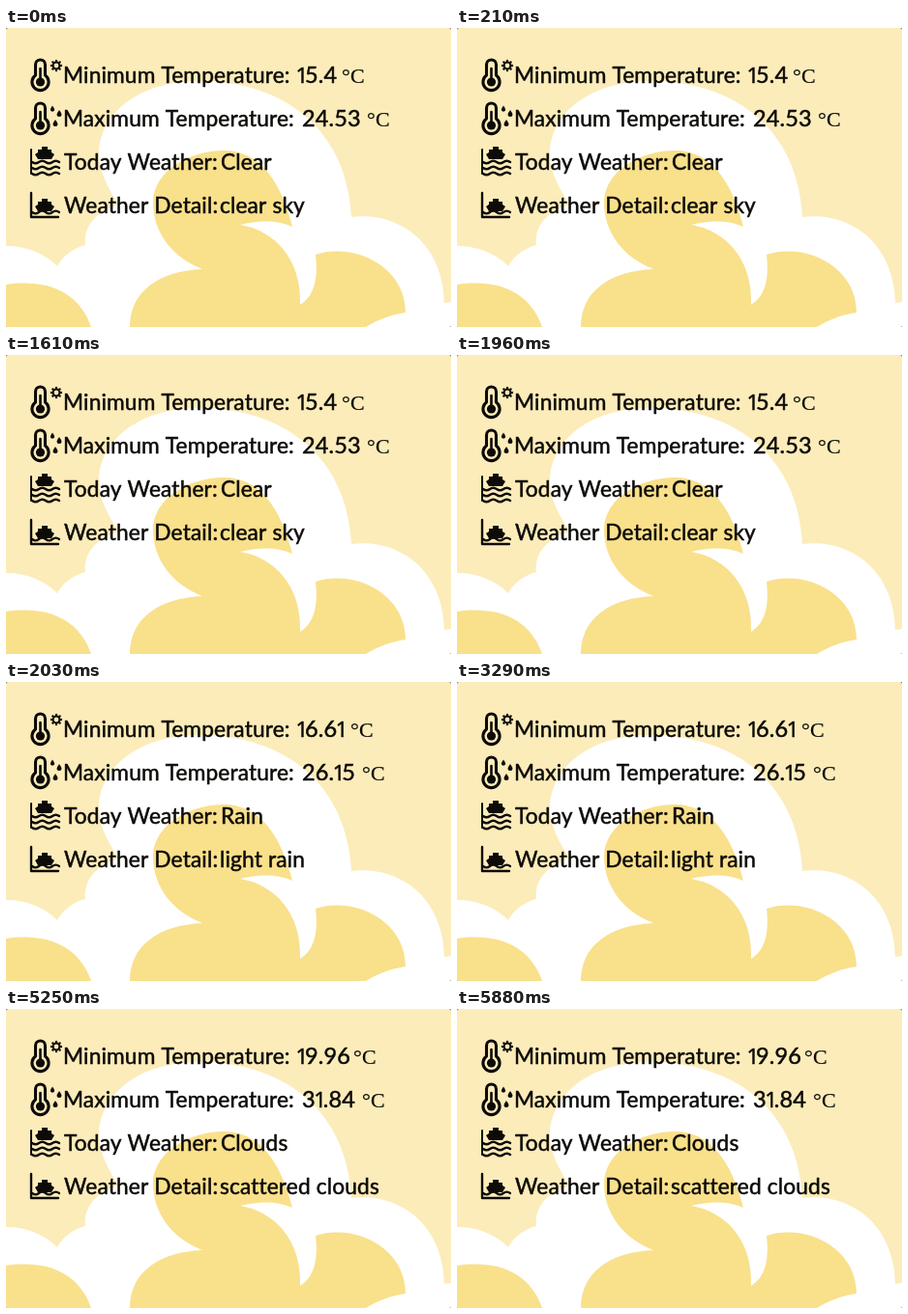
An HTML page with a canvas for the animation above (6090 ms loop, 460 px wide and 310 px high).

```html
<!DOCTYPE html>
<html lang="en">
<head>
<meta charset="utf-8">
<title>Weather card</title>
<style>
html, body { margin: 0; width: 100%; height: 100%; overflow: hidden; background: #777; }
canvas { display: block; width: 460px; height: 310px; }
</style>
</head>
<body>
<canvas id="card"></canvas>
<script>
const W = 460, H = 310, LOOP = 6090;
const INK = '#0d0b08', SKY = '#fcecba', SUN = '#f9e08b';
const canvas = document.getElementById('card');
const ctx = canvas.getContext('2d');
const dpr = window.devicePixelRatio || 1;
canvas.width = W * dpr;
canvas.height = H * dpr;

const days = [
  { from: 0, min: '15.4', minUnit: 347, max: '24.53', maxUnit: 373, sky: 'Clear', detail: 'clear sky' },
  { from: 2030, min: '16.61', minUnit: 356, max: '26.15', maxUnit: 368, sky: 'Rain', detail: 'light rain' },
  { from: 5180, min: '19.96', minUnit: 359, max: '31.84', maxUnit: 368, sky: 'Clouds', detail: 'scattered clouds' }
];

const shapes = [
  ['#fff', `M0 226 C22 226 40 234 53 247 C59 236 70 228 82 225
    C80 206 92 191 116 183 C106 166 95 148 96 128 C98 90 135 55 200 55
    C290 55 353 108 357 196 C405 190 452 222 453 285 L460 284 V310 H0 Z`],
  [SUN, 'M0 266 C40 260 75 272 88 310 H0 Z'],
  [SUN, `M128 310 C128 273 158 252 203 250 C172 238 152 212 152 181
    C152 149 189 127 225 127 C262 127 284 158 296 206
    C280 199 262 199 242 204 C278 210 306 240 304 287
    C318 278 323 262 320 235 C360 222 413 247 413 295
    C398 297 383 303 372 310 Z`]
].map(([color, d]) => [color, new Path2D(d)]);

function line(d, width) {
  ctx.lineWidth = width;
  ctx.stroke(new Path2D(d));
}

function dot(x, y, r) {
  ctx.beginPath();
  ctx.arc(x, y, r, 0, Math.PI * 2);
  ctx.fill();
}

function thermometer(y) {
  line(`M30.5 ${y + 16} V${y + 5} A5 5 0 0 1 40.5 ${y + 5} V${y + 16} A8.6 8.6 0 1 1 30.5 ${y + 16} Z`, 3.1);
  line(`M35.5 ${y + 9} V${y + 20}`, 2.6);
  dot(35.5, y + 23, 4.6);
}

function sun(x, y) {
  ctx.lineWidth = 2;
  ctx.beginPath();
  ctx.arc(x, y, 3.4, 0, Math.PI * 2);
  ctx.stroke();
  for (let i = 0; i < 8; i++) {
    const a = i * Math.PI / 4;
    dot(x + 5 * Math.cos(a), y + 5 * Math.sin(a), 1.2);
  }
}

function drop(x, y, s) {
  ctx.fill(new Path2D(`M${x} ${y - 1.6 * s} Q${x + 2 * s} ${y + s} ${x} ${y + 1.2 * s} Q${x - 2 * s} ${y + s} ${x} ${y - 1.6 * s} Z`));
}

function boat(y) {
  ctx.fill(new Path2D(`M37 ${y} H43 V${y + 3} H47 V${y + 6} L50 ${y + 8} L47 ${y + 13} H33 L30 ${y + 8} L33 ${y + 6} V${y + 3} H37 Z`));
}

function wave(y, width) {
  line(`M27 ${y} q3.5 2.6 7 0 t7 0 t7 0 t7 0`, width);
}

function icons() {
  ctx.strokeStyle = ctx.fillStyle = INK;
  ctx.lineCap = ctx.lineJoin = 'round';
  thermometer(33);
  sun(52, 39);
  thermometer(78);
  drop(48, 84, 2.2);
  drop(55, 89, 2.5);
  drop(51, 99, 2.5);

  boat(123);
  line('M26 126 V151', 2);
  for (const y of [139, 145, 151]) wave(y, 2.4);

  boat(177);
  line('M26 171 V196 H54', 2.4);
  wave(191, 2.2);
}

// Slightly emboldened text; returns its advance.
function write(s, x, y, font = '400 22.7px Lato, sans-serif', bold = 0.5) {
  ctx.font = font;
  ctx.letterSpacing = '0.15px';
  ctx.fillText(s, x, y);
  ctx.lineWidth = bold;
  ctx.strokeText(s, x, y);
  return ctx.measureText(s).width;
}

// Figures with a narrow, footless one.
function number(s, x, y) {
  for (const ch of s) {
    if (ch === '1') {
      write(ch, x - 1.5, y, '400 22.5px "Open Sans", sans-serif');
      x += 8;
    } else {
      x += write(ch, x, y, '400 23.5px Lato, sans-serif');
    }
  }
}

function degrees(x, y) {
  write('°C', x, y, '22px "Liberation Serif", serif', 0.2);
}

function draw(t) {
  const day = days.filter(d => d.from <= t).pop();
  ctx.setTransform(dpr, 0, 0, dpr, 0, 0);
  ctx.fillStyle = '#777';
  ctx.fillRect(0, 0, W, H);
  ctx.save();
  ctx.beginPath();
  ctx.roundRect(0, 0, W, H, 2.5);
  ctx.clip();
  ctx.fillStyle = SKY;
  ctx.fillRect(0, 0, W, H);
  for (const [color, path] of shapes) {
    ctx.fillStyle = color;
    ctx.fill(path);
  }
  icons();
  write('Minimum Temperature:', 59, 57);
  number(day.min, 301, 57);
  degrees(day.minUnit, 57);
  write('Maximum Temperature:', 59, 102);
  number(day.max, 306, 102);
  degrees(day.maxUnit, 102);
  write('Today Weather:', 60, 147);
  write(day.sky, 222, 147);
  write('Weather Detail:', 60, 192);
  write(day.detail, 221, 192);
  ctx.restore();
}

const start = performance.now();
function tick() {
  draw((performance.now() - start) % LOOP);
  requestAnimationFrame(tick);
}
tick();
</script>
</body>
</html>
```
